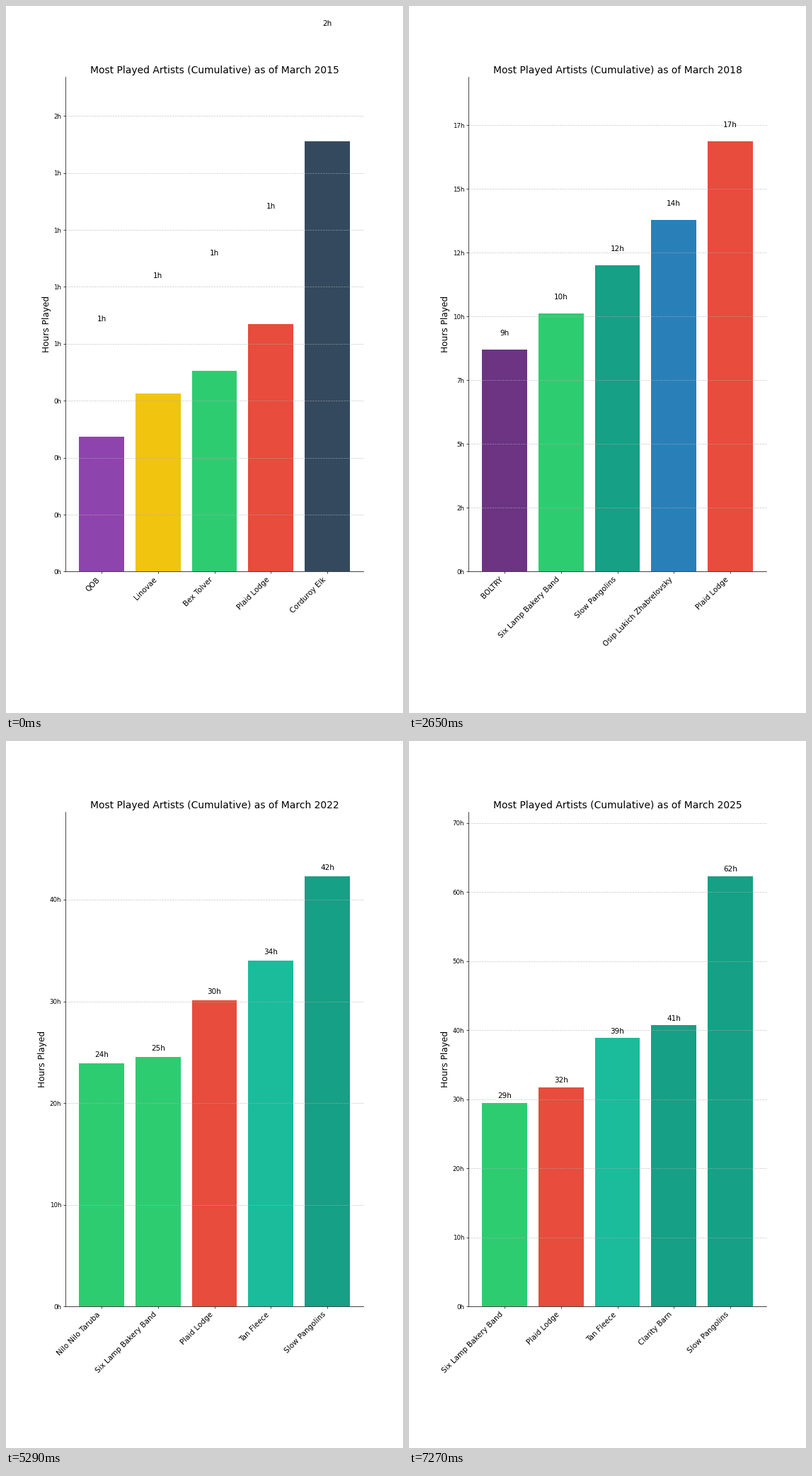
Animation, 561 px wide and 998 px high, one loop 9930 ms. Source, as a matplotlib script:

```python
import matplotlib.pyplot as plt
import numpy as np
from matplotlib.animation import FuncAnimation

WIDTH, HEIGHT, DPI = 561, 998, 64
PX = WIDTH / 9 / 72        # pixels per design point (9 inch wide layout)
PT = WIDTH / 9 / DPI       # design points to figure points
LEFT, RIGHT = 0.15 * WIDTH, 0.90 * WIDTH
TOP, BOTTOM = 0.10 * HEIGHT, 0.80 * HEIGHT
SLOT = (RIGHT - LEFT) / 5.28
TICK, TICK_PAD, LABEL_PAD = 3.5 * PX, 7 * PX, 4 * PX
LINE = 0.8 * PT

FIRST_YEAR = 2015
INTERVAL, FRAMES, FRAMES_PER_YEAR = 30, 331, 22

GREEN, TEAL = "#2ecc71", "#16a085"
COLORS = {
    "QOB": "#8e44ad",
    "Linovae": "#f1c40f",
    "Bex Tolver": GREEN,
    "Plaid Lodge": "#e74c3c",
    "Corduroy Elk": "#34495e",
    "Lina Sorby": "#e67e22",
    "Oslo Plumber Trio": GREEN,
    "Lad Upwind": TEAL,
    "Delia Thornwick": TEAL,
    "BOLTRY": "#6c3483",
    "Six Lamp Bakery Band": GREEN,
    "Slow Pangolins": TEAL,
    "Osip Lukich Zhabrelovsky": "#2980b9",
    "Nilo Nilo Taruba": GREEN,
    "Tan Fleece": "#1abc9c",
    "Clarity Barn": TEAL,
}

# Hours per artist, one ranking per year
RANKINGS = [
    {"QOB": 0.593, "Linovae": 0.783, "Bex Tolver": 0.882,
     "Plaid Lodge": 1.087, "Corduroy Elk": 1.889},
    {"Lina Sorby": 3.105, "Oslo Plumber Trio": 3.885, "Lad Upwind": 4.16,
     "Delia Thornwick": 7.318, "Plaid Lodge": 7.962},
    {"BOLTRY": 6.1, "Slow Pangolins": 6.7, "Six Lamp Bakery Band": 7.4,
     "Delia Thornwick": 8.3, "Plaid Lodge": 12.4},
    {"BOLTRY": 8.706, "Six Lamp Bakery Band": 10.12, "Slow Pangolins": 12.025,
     "Osip Lukich Zhabrelovsky": 13.79, "Plaid Lodge": 16.875},
    {"Nilo Nilo Taruba": 14.6, "Osip Lukich Zhabrelovsky": 15.6,
     "Tan Fleece": 17.4, "Plaid Lodge": 20.2, "Slow Pangolins": 22.0},
    {"Six Lamp Bakery Band": 18.37, "Nilo Nilo Taruba": 20.23,
     "Plaid Lodge": 23.16, "Tan Fleece": 26.57, "Slow Pangolins": 31.32},
    {"Nilo Nilo Taruba": 21.9, "Six Lamp Bakery Band": 22.4,
     "Plaid Lodge": 26.9, "Tan Fleece": 30.8, "Slow Pangolins": 36.8},
    {"Nilo Nilo Taruba": 23.91, "Six Lamp Bakery Band": 24.54,
     "Plaid Lodge": 30.11, "Tan Fleece": 34.01, "Slow Pangolins": 42.3},
    {"Six Lamp Bakery Band": 26.86, "Plaid Lodge": 31.19,
     "Clarity Barn": 32.16, "Tan Fleece": 35.85, "Slow Pangolins": 45.34},
    {"Six Lamp Bakery Band": 28.3, "Plaid Lodge": 31.5,
     "Tan Fleece": 37.5, "Clarity Barn": 38.3, "Slow Pangolins": 54.0},
    {"Six Lamp Bakery Band": 29.48, "Plaid Lodge": 31.74,
     "Tan Fleece": 38.86, "Clarity Barn": 40.71, "Slow Pangolins": 62.3},
]

plt.rcParams["font.family"] = "DejaVu Sans"
fig = plt.figure(figsize=(WIDTH / DPI, HEIGHT / DPI), dpi=DPI, facecolor="white")
ax = fig.add_axes([0, 0, 1, 1])
ax.set_xlim(0, WIDTH)
ax.set_ylim(HEIGHT, 0)
ax.axis("off")
ax.set_autoscale_on(False)


def line(x0, y0, x1, y1, **style):
    style = {"color": "black", "lw": LINE, "zorder": 2.5,
             "solid_capstyle": "butt", **style}
    return ax.plot([x0, x1], [y0, y1], **style)[0]


def text(x, y, label, size, **style):
    return ax.text(x, y, label, fontsize=size * PT, zorder=3, **style)


def slot_center(i):
    return LEFT + (0.64 + i) * SLOT


def tick_step(limit):
    """Smallest round step that needs at most nine intervals."""
    decade = 10 ** np.floor(np.log10(limit / 9))
    return next(s * decade for s in (1, 2, 2.5, 5, 10) if limit / (s * decade) <= 9)


def build_year(year, ranking):
    limit = max(ranking.values()) * 1.15

    def to_y(hours):
        return BOTTOM - hours / limit * (BOTTOM - TOP)

    artists = [text((LEFT + RIGHT) / 2, TOP - 6 * PX,
                    f"Most Played Artists (Cumulative) as of March {year}",
                    16, ha="center", va="baseline")]

    for i, (name, hours) in enumerate(ranking.items()):
        x, y = slot_center(i), to_y(hours)
        artists += ax.bar(x, y - BOTTOM, 0.8 * SLOT, bottom=BOTTOM,
                          color=COLORS[name], zorder=1)
        artists.append(text(x, to_y(hours + 0.5), f"{hours:.0f}h", 12,
                            ha="center", va="bottom"))
        artists.append(text(x, BOTTOM + TICK_PAD, name, 12,
                            ha="right", va="top", rotation=45))

    widest = 0
    for hours in np.arange(0, limit, tick_step(limit)):
        y, label = to_y(hours), f"{int(hours)}h"
        widest = max(widest, len(label))
        artists.append(line(LEFT, y, RIGHT, y, color="#b0b0b0", ls="--",
                            alpha=0.7, zorder=1.5))
        artists.append(line(LEFT - TICK, y, LEFT, y))
        artists.append(text(LEFT - TICK_PAD, y, label, 10,
                            ha="right", va="center_baseline"))

    label_x = LEFT - TICK_PAD - LABEL_PAD - widest * 0.635 * 10 * PX
    artists.append(text(label_x, (TOP + BOTTOM) / 2, "Hours Played", 14,
                        ha="right", va="center", rotation=90))
    return artists


line(LEFT, TOP, LEFT, BOTTOM, solid_capstyle="projecting")
line(LEFT, BOTTOM, RIGHT, BOTTOM, solid_capstyle="projecting")
for slot in range(5):
    line(slot_center(slot), BOTTOM, slot_center(slot), BOTTOM + TICK)

charts = [build_year(FIRST_YEAR + i, r) for i, r in enumerate(RANKINGS)]


def update(frame):
    # The first year holds for two steps, the last one until the loop ends
    current = min(max(frame // FRAMES_PER_YEAR - 1, 0), len(charts) - 1)
    for i, chart in enumerate(charts):
        for artist in chart:
            artist.set_visible(i == current)
    return charts[current]


anim = FuncAnimation(fig, update, frames=FRAMES, interval=INTERVAL,
                     repeat=True, cache_frame_data=False)
plt.show()
```
